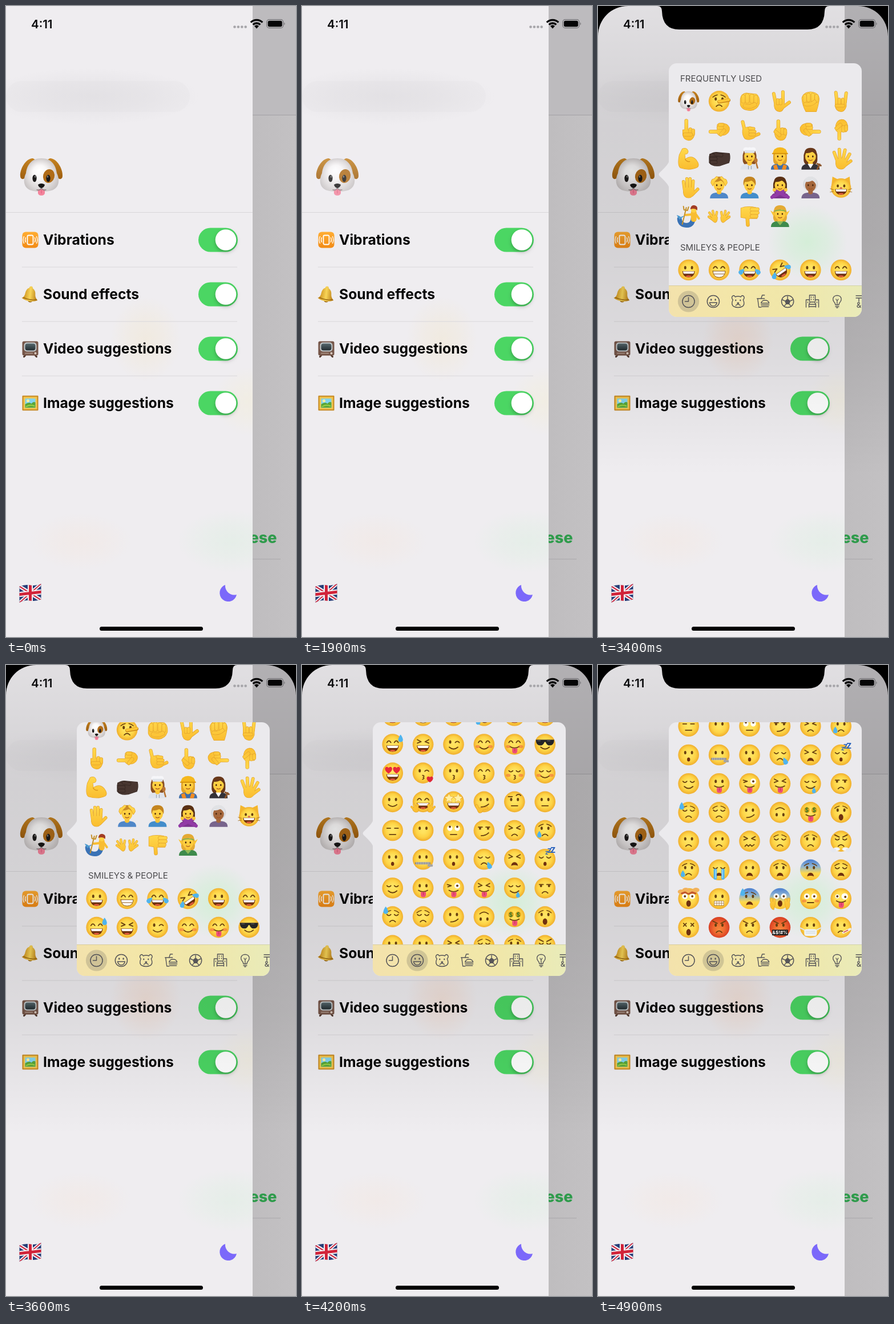
An HTML page with a canvas that plays this animation: 508x1102 px, repeating every 5000 ms.

```html
<!DOCTYPE html>
<html lang="en">
<head>
<meta charset="utf-8">
<title>Settings with emoji picker</title>
<style>
html, body { margin: 0; width: 100%; height: 100%; overflow: hidden; background: #efedf0; }
canvas { position: absolute; left: 0; top: 0; width: 508px; height: 1102px; }
</style>
</head>
<body>
<canvas id="base" width="508" height="1102"></canvas>
<canvas id="pop" width="508" height="1102"></canvas>
<script>
const base = document.getElementById('base').getContext('2d');
const popCanvas = document.getElementById('pop');
const pop = popCanvas.getContext('2d');
let c = base;

// Drawing helpers
function fill(d, color) { c.fillStyle = color; c.fill(new Path2D(d)); }
function line(d, color = INK, w = 1.8) {
  c.strokeStyle = color; c.lineWidth = w; c.lineCap = c.lineJoin = 'round';
  c.stroke(new Path2D(d));
}
function oval(x, y, rx, ry, color, turn = 0) {
  c.beginPath(); c.ellipse(x, y, rx, ry, turn, 0, 7); c.fillStyle = color; c.fill();
}
function ring(x, y, r, color, w) {
  c.beginPath(); c.arc(x, y, r, 0, 7); c.strokeStyle = color; c.lineWidth = w; c.stroke();
}
function box(x, y, w, h, r, color) {
  c.beginPath(); c.roundRect(x, y, w, h, r); c.fillStyle = color; c.fill();
}
function text(s, x, y, font, color, align = 'left') {
  c.font = font + ' Inter, sans-serif'; c.fillStyle = color; c.textAlign = align;
  c.fillText(s, x, y);
}
function at(x, y, sx, sy, draw) {
  c.save(); c.translate(x, y); c.scale(sx, sy); draw(); c.restore();
}
function pair(draw) { draw(); at(0, 0, -1, 1, draw); }
function stops(g, colors) {
  colors.forEach((col, i) => g.addColorStop(i / (colors.length - 1), col));
  return g;
}
const down = (y0, y1, ...colors) => stops(base.createLinearGradient(0, y0, 0, y1), colors);
const across = (x0, x1, ...colors) => stops(base.createLinearGradient(x0, 0, x1, 0), colors);
const radial = (x, y, r, ...colors) => stops(base.createRadialGradient(x, y, 0, 0, 0, r), colors);
function glow(x, y, rx, ry, rgb, a) {
  at(x, y, rx, ry, () => oval(0, 0, 1, 1, radial(0, 0, 1, `rgba(${rgb},${a})`, `rgba(${rgb},${a * .6})`, `rgba(${rgb},0)`)));
}

const INK = '#68400f', WHITE = '#fff', BLUE = '#4fb4ee';
const SKIN = down(-18, 18, '#ffd94c', '#fabd2f');
const YELLOW = radial(0, -2, 19, '#ffe566', '#ffe05a', '#fdd244', '#eeaa2b');
const RED = radial(0, 4, 19, '#f58a3c', '#ef6a30', '#d73c22');
const COLD = down(-18, 18, '#4b7fd0', '#8eb4d3', '#ffd94c', '#fac235');
const BROWN = down(-32, 10, '#c58321', '#98580c');
const HEART = 'M0 6C-11 -1 -5 -9 0 -4C5 -9 11 -1 0 6Z';
const DROP = 'M0 -7C6 1 5 6 0 6C-5 6 -6 1 0 -7Z';

function star(r) {
  let d = '';
  for (let i = 0; i < 10; i++) {
    const a = i * Math.PI / 5 - Math.PI / 2, q = i % 2 ? r * .5 : r;
    d += (i ? 'L' : 'M') + Math.cos(a) * q + ' ' + Math.sin(a) * q;
  }
  return d + 'Z';
}

// Faces: first letter eyes, second letter mouth, the rest are extras
const dot = x => oval(x, -4, 2, 2.9, INK);
const ball = (x, r, px, py) => { oval(x, -4, r, r, WHITE); oval(x + px, -4 + py, 2, 2, INK); };
const eyes = {
  d: () => pair(() => dot(5.9)),
  a: () => pair(() => line('M3 -3Q6.5 -9 10 -3')),
  u: () => pair(() => line('M3 -4Q6.5 0 10 -4')),
  x: () => pair(() => line('M10 -8L3.5 -4.5L10 -2')),
  l: () => pair(() => line('M3.5 -4H10')),
  w: () => { dot(-5.9); line('M3 -3Q6.5 -7 10 -3'); },
  r: () => { ball(-6.5, 4.6, 0, -2.6); ball(6.5, 4.6, 0, -2.6); },
  b: () => { ball(-6.5, 4.9, 0, 0); ball(6.5, 4.9, 0, 0); },
  k: () => { ball(-6.5, 3.6, 0, 0); ball(6.5, 5.6, 1, 1); },
  m: () => { line('M-11 -6L-4 -4L-10 -2'); ball(6.5, 5, 0, 0); },
  v: () => pair(() => { line('M3 -6H10', INK, 1.7); oval(7, -3.6, 2, 2.2, INK); }),
  X: () => pair(() => line('M4 -7L9 -2M9 -7L4 -2')),
  H: () => pair(() => at(7, -5, 1, 1, () => fill(HEART, '#e8293a'))),
  S: () => pair(() => at(8, -6, 1, 1, () => { fill(star(9), '#d98a20'); fill(star(8), '#fff0a5'); })),
  s: () => { fill('M-16 -8H16Q16 2 8 2Q3 2 1 -4H-1Q-3 2 -8 2Q-16 2 -16 -8Z', '#252526'); line('M-13 -6L-8 -6M4 -6H9', '#666', 1); },
  $: () => [-6.5, 6.5].forEach(x => { oval(x, -4, 5, 5.5, '#e3a91f'); text('$', x, 0, '700 10px', '#36752a', 'center'); })
};
const mouths = {
  '-': () => {},
  G: () => { fill('M-11 2H11Q10 13 0 13Q-10 13 -11 2Z', '#70310f'); fill('M-10 2.5H10L8.6 6.6H-8.6Z', WHITE); oval(0, 11, 4.5, 1.5, '#e55a3c'); },
  T: () => { fill('M-11 2H11Q10 13 0 13Q-10 13 -11 2Z', WHITE); line('M-11 2H11Q10 13 0 13Q-10 13 -11 2ZM-9 7H9', '#8a5418', 1); },
  s: () => line('M-7.5 5Q0 11.5 7.5 5'),
  f: () => line('M-5.5 7H5.5'),
  n: () => line('M-5 9Q0 3.5 5 9'),
  o: () => oval(0, 8, 2.7, 3.5, '#70310f'),
  O: () => oval(0, 8.5, 4, 5.6, '#70310f'),
  k: () => line('M-1 4Q4 5 0 7.5Q4 9 -1 11', INK, 1.6),
  t: () => { line('M-8 4Q0 9 8 4'); fill('M-4 7H5V12Q4 17 0 16Q-4 16 -4 12Z', '#ed4e78'); line('M.5 8V12', '#bf2e55', 1); },
  z: () => { line('M-12 7H11', '#868686', 4); for (let x = -11; x < 11; x += 3) line(`M${x} 5V9`, '#ddd', 1); box(8, 9, 9, 4, 1, '#a5a5a5'); },
  w: () => line('M-8 9L-5 6L-2 9L1 6L4 9L8 6'),
  g: () => { box(-9, 4, 18, 8, 3, WHITE); line('M-8 4H8V12H-8ZM-8 8H8M-4 4V12M0 4V12M4 4V12', '#9d6a29', .8); },
  q: () => line('M-5 9Q3 9 8 4'),
  c: () => fill('M-6 11.5Q-5 5 0 5Q5 5 6 11.5Q0 9 -6 11.5Z', '#70310f'),
  C: () => { box(-14, 4, 28, 10, 1, '#202020'); text('&$!#%', 0, 12, '700 8px', WHITE, 'center'); },
  M: () => { line('M-18 1L-10 5M18 1L10 5', '#dfe6ea', 2); box(-11, 3, 22, 12, 4, '#eef2f4'); line('M-8 7H8M-8 10H8', '#c4ced4', .8); }
};
const drop = (x, y, s = 1, a = 0) => at(x, y, s, s, () => { c.rotate(a); fill(DROP, BLUE); });
const extras = {
  t: () => pair(() => drop(14, 3, .95, -.8)),
  T: () => pair(() => { box(4, -2, 5.5, 19, 2, BLUE); line('M6 0V14', '#b9e6ff', 1.2); }),
  d: () => drop(-10, 7, .9),
  D: () => drop(14, -10, 1),
  e: () => drop(-12, -11, 1),
  j: () => drop(9, 11, 1, -.4),
  l: () => drop(6, 12, .8),
  b: () => pair(() => line('M3 -11Q8 -10 11 -7', INK, 1.4)),
  B: () => pair(() => line('M3 -7L11 -11')),
  1: () => line('M-11 -9H-4M3 -11Q7 -15 11 -11'),
  r: () => pair(() => oval(11, 4, 4, 2.6, 'rgba(239,93,60,.5)')),
  K: () => at(12, 11, .9, .9, () => fill(HEART, '#df2639')),
  Z: () => [[3, -8, 8], [8, -11, 11], [14, -11, 13]].forEach(([x, y, s]) => text('Z', x, y, `800 ${s}px`, '#2862bd', 'center')),
  h: () => pair(() => hand('M8 12Q10 6 15 8L18 14Q14 20 9 17Z', 'M11 11L9 6M14 11L16 5M16 13L20 9', '', 4)),
  c: () => hand('M-11 12Q-4 9 -2 14Q-3 20 -9 19Z', 'M-9 16L-13 7M-5 13L5 11', '', 5),
  p: () => { line('M4 9L16 3', '#eee', 4); line('M5 8.5L12 5', '#d8372c', 1.3); },
  L: () => { [-13, -5, 5, 13].forEach((x, i) => oval(x, -12 - i % 2 * 3, 6, 4, '#f2b25c')); line('M-12 -9L-6 -11L0 -8L6 -11L12 -9', '#c2562c', 3); },
  S: () => pair(() => { oval(8, 14, 6, 3, '#f7f7fb'); oval(13, 16, 5, 3.5, '#e5e8f0'); }),
  Q: () => pair(() => hand('M9 8Q14 2 17 9Q17 18 11 19Z', 'M11 12L10 2M14 11L15 1', '', 5)),
  N: () => { line('M0 1L17 -2', '#c17b13', 6); line('M0 .5L17 -2.5', '#fbc535', 4.6); }
};
function face(code) {
  const [eye, mouth, ...more] = code;
  if (more.includes('Y')) c.rotate(-.6);
  if (more.includes('I')) c.scale(1, -1);
  oval(0, 0, 18.3, 18.3, more.includes('R') ? RED : more.includes('F') ? COLD : YELLOW);
  eyes[eye](); mouths[mouth]();
  more.forEach(m => extras[m] && extras[m]());
}

// Hands: palm outline, stretched fingers, folded fingers
function hand(palm, out, over = '', w = 7, tone = SKIN, edge = '#e3a32c') {
  const fingers = d => d.split('M').slice(1).forEach(f => { line('M' + f, edge, w); line('M' + f, tone, w - 1.4); });
  line(palm, edge, 1.4);
  fingers(out);
  fill(palm, tone);
  fingers(over);
}
const pointer = () => hand('M-9 0Q-7 -4 -3 -3H9Q13 1 11 9Q9 18 1 18Q-7 17 -9 8Z', 'M-3 3V-15', 'M4 -1V5M9 1V6M-8 3L-1 9', 6.5);
const turned = (a, draw) => () => { c.rotate(a); draw(); };

function person(hair, body, { long, tone = SKIN, over } = {}) {
  if (long) box(-12, -16, 24, 29, 11, hair);
  fill('M-16 19Q-16 10 -6 9H6Q16 10 16 19Z', body);
  fill('M-4 5H4V10Q0 14 -4 10Z', tone);
  oval(0, -4, 9.5, 11, tone);
  fill('M-10.5 -3Q-13 -19 0 -19Q13 -19 10.5 -3Q8 -10 3 -12Q-4 -9 -8 -10Z', hair);
  pair(() => oval(4, -4, 1.3, 1.7, '#46240c'));
  line('M-3 2Q0 4 3 2', '#a45420', 1.3);
  if (over) over();
}

function dog() {
  pair(() => fill('M-15 -32C-28 -32 -38 -12 -37 -1C-37 6 -29 6 -26 -2C-24 -12 -18 -19 -8 -28Z', BROWN));
  fill('M0 -32C17 -32 25 -21 27 -6C33 6 31 20 18 24C8 27 -8 27 -18 24C-31 20 -33 6 -27 -6C-25 -21 -17 -32 0 -32Z',
    radial(-4, -12, 36, '#fff', '#f9f7f7', '#dedada', '#bdb8b8'));
  oval(13, -1, 10, 12, '#b06c18', .25);
  pair(() => { oval(12, 3, 3.6, 6.3, '#1b1918'); oval(11, 0, 1.2, 2, '#777'); });
  fill('M-6 22H6V29Q5 33 0 33Q-5 33 -6 29Z', '#f4849c');
  line('M0 20V29', '#d9587a', 1);
  line('M-8 23Q-2 25 0 19Q2 25 8 23', '#8b8585', 1.4);
  fill('M-6 14Q0 10 6 14Q5 19 0 20Q-5 19 -6 14Z', '#161515');
}

const art = {
  dog: () => at(0, 0, .5, .54, dog),
  lie: () => face('dnbN'),
  punch: () => hand('M-16 -4Q-14 -13 -6 -14L12 -12Q18 -8 17 4Q13 15 2 16Q-13 16 -16 6Z', '', 'M-11 -8V0M-4 -10V0M4 -9V0M11 -7V1M-8 8Q0 11 9 6', 7.6),
  love: () => hand('M-10 -2H7V9Q5 18 -1 18Q-9 17 -10 8Z', 'M-8 2L-11 -13M5 2V-16M4 11L16 2', 'M-4 -2V4M1 -2V4', 6),
  fist: () => hand('M-15 -5Q-13 -15 0 -16Q14 -15 15 -4Q14 6 10 18H-8Q-14 8 -15 -5Z', '', 'M-10 -9V-1M-3.5 -11V-2M4 -11V-2M10.5 -9V-1M-9 5Q0 7 7 1', 7),
  horns: () => hand('M-10 -2H9V9Q6 18 0 18Q-9 17 -10 8Z', 'M-7 2L-9 -15M7 2L9 -14', 'M-3 -3V4M3 -3V4M-8 8L4 8', 6),
  up: () => hand('M-10 0H10V9Q7 18 0 18Q-9 17 -10 8Z', 'M-4 3V-16', 'M3 -1V5M8 1V6M-7 8L4 8', 6.5),
  left: turned(-Math.PI / 2, pointer),
  call: () => hand('M-12 0Q-7 -6 3 -5Q11 0 9 13Q0 19 -8 15Q-13 9 -12 0Z', 'M-8 3L-12 -14M4 12L16 7', 'M0 -3L7 -2M1 3L9 3M1 8L8 8', 6),
  point: pointer,
  right: turned(Math.PI / 2, () => at(0, 0, -1, 1, pointer)),
  down: () => at(0, 0, 1, -1, pointer),
  flex: () => {
    const d = 'M-11 -17Q-3 -20 -1 -13Q-1 -8 -7 -8L-6 1Q5 -7 13 2Q20 11 15 15Q2 21 -14 16Q-20 12 -16 -7Z';
    line(d, '#e3a32c', 1.4); fill(d, SKIN); line('M-6 1Q-3 6 2 5', '#d8921d', 1.3);
  },
  dark: () => hand('M-17 -4Q-14 -11 -5 -11L18 -9Q20 0 17 7L2 12Q-12 14 -17 7Z', '', 'M-14 -6H-6M-14 0H-6M-13 6H-6M-6 -8L4 -6', 6.5, '#483630', '#30231e'),
  chef: () => person('#8a4f20', '#dfe3eb', { long: 1, over() {
    [-6, 0, 6].forEach(x => oval(x, -16, 5, 4, '#f6f6f9'));
    box(-9, -15, 18, 5, 1, '#dfe3ea');
    line('M14 16L11 5', '#b97535', 2.6); oval(11, 3, 3, 4, '#b97535');
    line('M-2 13V18M3 13V18', '#9aa3b0', 1.2);
  } }),
  builder: () => person('#e2a42a', '#3d6eab', { long: 1, over() {
    fill('M-13 -9Q-11 -20 0 -20Q11 -20 13 -9Z', '#f5b81d'); line('M-13 -9H13', '#d6940d', 2);
    fill('M-12 12L-6 10L-3 19H-10ZM12 12L6 10L3 19H10Z', '#f18b22');
  } }),
  judge: () => person('#68381a', '#343238', { long: 1, over() { fill('M-5 9H5L0 17Z', '#fff'); line('M12 18L16 10M12 9L18 12', '#8b552b', 3); } }),
  spread: () => hand('M-9 2Q0 -4 9 2L10 9Q7 18 0 18Q-8 18 -9 9Z', 'M-6 5L-12 -11M-2 3L-3 -16M3 3L7 -15M7 6L15 -8M5 13L17 4', '', 5.8),
  palm: () => hand('M-9 0H9V9Q7 18 0 18Q-8 18 -9 9Z', 'M-7 5L-9 -10M-2.5 4L-3 -15M2.5 4V-15M7 5L8 -11M6 13L16 3', '', 5.6),
  massage: () => person('#c88a27', '#4f87c8', { over() { pair(() => hand('M6 -14Q13 -17 14 -8L11 -3Z', 'M9 -12L4 -17', '', 5)); } }),
  pout: () => person('#c48520', '#438dcb'),
  no: () => person('#593014', '#7c348f', { long: 1, over() { line('M-14 17L8 6M14 17L-8 6', '#923ba6', 6); pair(() => oval(10, 4, 3, 3, SKIN)); } }),
  elder: () => { oval(0, -6, 13, 13, '#d7d8dc'); person('#e1e2e5', '#77648c', { tone: '#a5673c' }); },
  cat: () => { pair(() => fill('M-17 0L-15 -19L-3 -13Z', '#f4b62c')); at(0, 1, .96, .92, () => face('dG')); oval(0, 1, 2.3, 1.6, '#db6a55'); pair(() => line('M13 4L19 2M13 7L19 8', '#9b671a', .8)); },
  mer: () => {
    line('M8 4Q7 16 -4 16Q-15 15 -16 5', '#3a72b5', 8); fill('M-16 6L-21 -2Q-14 0 -14 2Q-10 -1 -8 0Z', '#4c9bd0');
    line('M9 -6V5', '#f8bd32', 10); line('M6 -3L-5 -2M13 -3L18 4', '#f8bd32', 4);
    oval(9, -12, 5, 6, SKIN); fill('M3 -12Q4 -20 10 -19Q17 -18 15 -10Q11 -15 3 -12Z', '#a23d25');
    line('M-11 14L-4 -15M-9 -17L-8 -11L-2 -10L0 -16', '#c5912a', 2);
  },
  open: () => pair(() => hand('M3 2Q7 -4 12 1Q13 9 7 11Q3 10 3 2Z', 'M6 3L4 -7M9 2L11 -9M10 4L17 -6M11 6L18 1', '', 4.4)),
  thumb: () => hand('M-15 -14Q-4 -18 11 -15Q16 -8 13 4H-3L-15 2Z', 'M-4 0L-3 15', 'M4 -12H14M4 -6H14M4 0H12', 6.6),
  elf: () => person('#e4aa34', '#3e8a4c', { long: 1, over() { pair(() => fill('M9 -5L17 -10L11 1Z', '#fac536')); line('M-9 -9Q0 -12 9 -9', '#82af4b', 2); fill('M-6 9H6L0 16Z', '#91b956'); } })
};

const grid = s => s.split('|').map(r => r.split(' '));
const frequent = grid('dog lie punch love fist horns|up left call point right down|flex dark chef builder judge spread|palm massage pout no elder cat|mer open thumb elf');
const smileys = grid('dG aT aGt xGtY dG aG|aGD xG ws asr atr ss|HG wkK dk ak ukr usr|ds aGh SG dqc df1 df|lf d- rf vq xn dnbd|' +
  'do dz do unj xc uoZ|us dt mt xt usl vn|unbe unb dq dsI $t dOb|dn dn xw unb dnb unBS|dnbd ucT dc dcb dcFb ucb|bOL dg dcFbe bOFQ bfr kt|XO dnRB dnB dCRB dM dnp');

// Settings screen
function toggle(y) {
  box(337, y - 21, 69, 42, 21, '#4bd663');
  c.save();
  c.shadowColor = 'rgba(0,0,0,.25)'; c.shadowBlur = 6; c.shadowOffsetY = 3;
  oval(385, y, 18.3, 18.3, WHITE);
  c.restore();
}
const rowIcons = [
  () => {
    box(-14, -14, 28, 28, 6, down(-14, 14, '#ffad32', '#f28b16'));
    c.beginPath(); c.roundRect(-5, -8, 10, 16, 2); c.strokeStyle = WHITE; c.lineWidth = 1.8; c.stroke();
    pair(() => line('M8 -4Q10 0 8 4M11 -6Q13.5 0 11 6', WHITE, 1.3));
  },
  () => {
    c.rotate(.12);
    oval(1, 10, 4, 4, '#9b6816');
    fill('M0 -14Q3 -14 3 -11Q9 -8 9 1Q10 6 14 9Q7 13 0 12Q-8 12 -14 8Q-9 5 -9 -1Q-8 -9 -3 -11Q-3 -14 0 -14Z', across(-13, 13, '#c98a19', '#f8d558', '#b57712'));
    line('M-11 7Q0 11 12 8', '#96640f', 1.2);
  },
  () => {
    line('M-9 12L-11 14M9 12L11 14', '#50362b', 3);
    box(-14, -13, 28, 25, 3, '#765649'); box(-11, -11, 22, 16, 5, '#c0c6c8');
    box(-9, -9, 18, 12, 4, down(-9, 4, '#55676d', '#1f292d')); line('M-9 8H4', '#b29a8d', 1.4); oval(9, 8, 2, 2, '#d9c9bd');
  },
  () => {
    box(-14, -13, 28, 26, 1, '#c5871e'); box(-12, -11, 24, 22, 0, '#f2c650');
    box(-9, -8, 18, 16, 0, '#82d4ef'); oval(-4, -4, 2.5, 2.5, '#fff0a0');
    fill('M-9 2Q-2 -3 2 1Q6 -4 9 -1V8H-9Z', '#58a639'); line('M-7 6Q0 2 7 5', '#9bd447', 2);
  }
];

function flag() {
  c.save();
  c.transform(1, -.12, 0, 1, 42.5, 1025.5);
  c.clip(new Path2D('M-19 -14Q-9 -17 0 -14Q10 -11 19 -14V13Q10 16 0 13Q-9 10 -19 14Z'));
  box(-20, -18, 40, 36, 0, '#263e78');
  line('M-20 -15L20 15M20 -15L-20 15', '#f2f2f5', 6);
  line('M-20 -15L20 15M20 -15L-20 15', '#cd2840', 2);
  line('M0 -18V18M-20 0H20', '#f2f2f5', 9);
  line('M0 -18V18M-20 0H20', '#d12339', 5);
  c.restore();
}

function statusBar() {
  text('4:11', 44, 38.5, '600 20.5px', '#08080a');
  for (let i = 0; i < 4; i++) oval(400.5 + i * 6.4, 36.5, 2.3, 2.3, '#a6a5a9');
  [14.6, 9].forEach(r => {
    c.beginPath(); c.arc(439, 39, r, -2.35, -.79); c.lineWidth = 3.4; c.lineCap = 'butt'; c.strokeStyle = '#050506'; c.stroke();
  });
  fill('M439 39.5L435 35Q439 31.5 443 35Z', '#050506');
  c.beginPath(); c.roundRect(456.7, 23.7, 29, 14.6, 4.5); c.lineWidth = 1.2; c.strokeStyle = '#737276'; c.stroke();
  box(458.7, 25.7, 25, 10.6, 2.8, '#050506');
  fill('M487.3 28.5Q490 31 487.3 33.5Z', '#737276');
}

function settings(t) {
  const open = t >= 2200;
  box(0, 0, 508, 1102, 0, '#efedf0');
  box(0, 131, 322, 54, 27, 'rgba(120,118,124,.02)');
  glow(150, 158, 190, 50, '190,188,193', .2);
  glow(245, 582, 62, 75, open ? '246,205,180' : '243,229,196', .36);
  glow(425, 690, 60, 60, '245,238,205', .35);
  glow(130, 935, 90, 50, '248,225,208', .24);
  glow(395, 935, 95, 55, '205,240,212', .28);
  box(432, 0, 76, 1102, 0, across(432, 508, '#bfbdbf', '#c3c1c3'));
  box(432, 0, 76, 190, 0, '#bdbbbe');
  box(432, 190, 76, 1, 0, '#a3a1a5');
  c.save(); c.beginPath(); c.rect(432, 900, 76, 60); c.clip();
  text('ese', 474.5, 938, '800 27px', '#2e9b4b', 'right');
  c.restore();
  box(432, 965.5, 49, 1, 0, '#aaa8ac');

  at(62, 298, 1, 1, dog);
  const press = t > 1500 && t < 2000 ? .3 * Math.sin((t - 1500) / 500 * Math.PI) : 0;
  if (press) box(22, 262, 80, 72, 0, `rgba(239,237,240,${press})`);

  box(0, 360, 432, 1, 0, '#d8d6d9');
  ['Vibrations', 'Sound effects', 'Video suggestions', 'Image suggestions'].forEach((label, i) => {
    const y = 408.5 + i * 95;
    at(42.5, y, 1, 1, rowIcons[i]);
    text(label, 65, y + 8.5, '700 24.7px', '#050505');
    toggle(y);
    if (i < 3) box(28, y + 47, 377, 1, 0, '#dad8db');
  });
  flag();
  fill('M384 1011A15 15 0 1 0 404 1028A16 16 0 0 1 384 1011Z', '#7b68fa');

  if (open) {
    box(0, 0, 508, 820, 0, down(0, 820, 'rgba(0,0,0,.06)', 'rgba(0,0,0,.12)', 'rgba(0,0,0,.115)', 'rgba(0,0,0,.075)', 'rgba(0,0,0,0)'));
    fill('M0 0H104Q112 0 112 9Q113 41 142 41H367Q396 41 397 9Q397 0 405 0H508V53C508 23 485 0 455 0H53C23 0 0 23 0 53Z', '#000');
  }
  statusBar();
  box(164, 1084, 181, 7, 3.5, '#000');
}

// Emoji picker
const GREY = '#565558';
const tabs = [
  () => { ring(0, 0, 10.6, GREY, 1.5); line('M0 -7V0H-6', GREY, 1.5); },
  () => { ring(0, 0, 10.6, GREY, 1.5); pair(() => oval(3.7, -3, 1.3, 1.8, GREY)); line('M-6.5 2H6.5Q5 8 0 8Q-5 8 -6.5 2Z', GREY, 1.4); },
  () => {
    line('M-5 -8Q0 -10 5 -8Q7 -12 10 -9Q12 -6 9 -3Q13 6 7 9Q0 12 -7 9Q-13 6 -9 -3Q-12 -6 -10 -9Q-7 -12 -5 -8Z', GREY, 1.4);
    pair(() => oval(4, -2, 1.1, 1.4, GREY)); oval(0, 3, 2, 1.4, GREY); line('M-4 7Q0 3 4 7', GREY, 1.2);
  },
  () => line('M-10 -5H3M-9 -5L-7 10H-3M-3 -5L-1 -11H3M-3 3Q-2 -2 4 -2Q10 -2 11 3ZM-3 6H11M-2 9H10', GREY, 1.4),
  () => { ring(0, 0, 10.6, GREY, 1.5); fill('M0 -5L5 -1L3 5H-3L-5 -1Z', GREY); line('M0 -5V-9M5 -1L9 -3M3 5L6 8M-3 5L-6 8M-5 -1L-9 -3', GREY, 1.4); },
  () => line('M-11 10V-3H-5M-5 0V-11H5V0M5 -3H11V10M-6 10V5L-4 1H4L6 5V10M-6 5H6M-6 9H6M-2 -8V-7M2 -8V-7M-2 -4V-3M2 -4V-3M-8 1V2M8 1V2', GREY, 1.4),
  () => line('M-3 6Q-3 3 -6 0Q-9 -5 -5 -9Q0 -12 5 -9Q9 -5 6 0Q3 3 3 6ZM-3 9H3M-1 11H1M0 6V-1L-2 -4M0 -1L2 -4', GREY, 1.3),
  () => { line('M-5 -10H5M-5 -6H5M0 -6V0', GREY, 1.4); text('&', 0, 11, '500 13px', GREY, 'center'); }
];
const bubble = 'M138 100H448A14 14 0 0 1 462 114V529A14 14 0 0 1 448 543H138A14 14 0 0 1 124 529V316Q123 311 108 297Q105 294 108 291Q123 277 124 272V114A14 14 0 0 1 138 100Z';

function drawGrid(rows, top, draw) {
  rows.forEach((row, r) => {
    const y = top + r * 50.2;
    if (y < 75 || y > 512) return;
    row.forEach((name, i) => at(158.7 + i * 53.4, y, 1, 1, () => draw(name)));
  });
}

function picker(offset) {
  c.save();
  c.clip(new Path2D(bubble));
  box(100, 100, 362, 443, 0, '#ebeaed');
  glow(367, 412, 70, 65, '188,243,193', .48);
  text('FREQUENTLY USED', 144, 135 - offset, '400 15px', '#4b4a4d');
  drawGrid(frequent, 169.3 - offset, name => art[name]());
  text('SMILEYS & PEOPLE', 144, 429.5 - offset, '400 15px', '#4b4a4d');
  drawGrid(smileys, 464 - offset, face);

  box(124, 488, 338, 55, 0, offset ? across(124, 462, '#f3e2ac', '#f3e6a8', '#f0e7aa', '#e9ebb9') : across(124, 462, '#e9e8eb', '#e7e9e9', '#dcebdf', '#e2eae4'));
  box(124, 488, 338, 1, 0, 'rgba(90,90,80,.16)');
  const tab = offset > 320 ? 1 : 0;
  oval(158.5 + tab * 43.4, 516, 18.6, 18.6, 'rgba(60,60,66,.19)');
  tabs.forEach((draw, i) => at(i < 7 ? 158.5 + i * 43.4 : 457, 516, 1, 1, draw));
  c.restore();
}

// Scroll keys: time, offset, speed in pixels per 100 ms
const keys = [[3400, 3, 12], [3900, 211, 60], [4500, 494, 29], [4900, 558, 6]];
function scroll(t) {
  if (t < 3400) return 0;
  const i = Math.max(0, keys.findIndex(k => k[0] >= t) - 1);
  const [t0, a, va] = keys[i], [t1, b, vb] = keys[i + 1];
  const u = (t - t0) / (t1 - t0), n = (t1 - t0) / 100, v = 1 - u;
  return a * v * v * (1 + 2 * u) + b * u * u * (3 - 2 * u) + va * n * u * v * v - vb * n * u * u * v;
}

let last = -1;
function frame(now) {
  const t = Math.floor(now % 5000 / 100) * 100;
  if (t !== last) {
    last = t;
    c = base;
    settings(t);
    c = pop;
    c.clearRect(0, 0, 508, 1102);
    popCanvas.style.opacity = t < 2300 ? .5 : 1;
    if (t >= 2200) picker(scroll(t));
  }
  requestAnimationFrame(frame);
}
frame(0);
</script>
</body>
</html>
```
